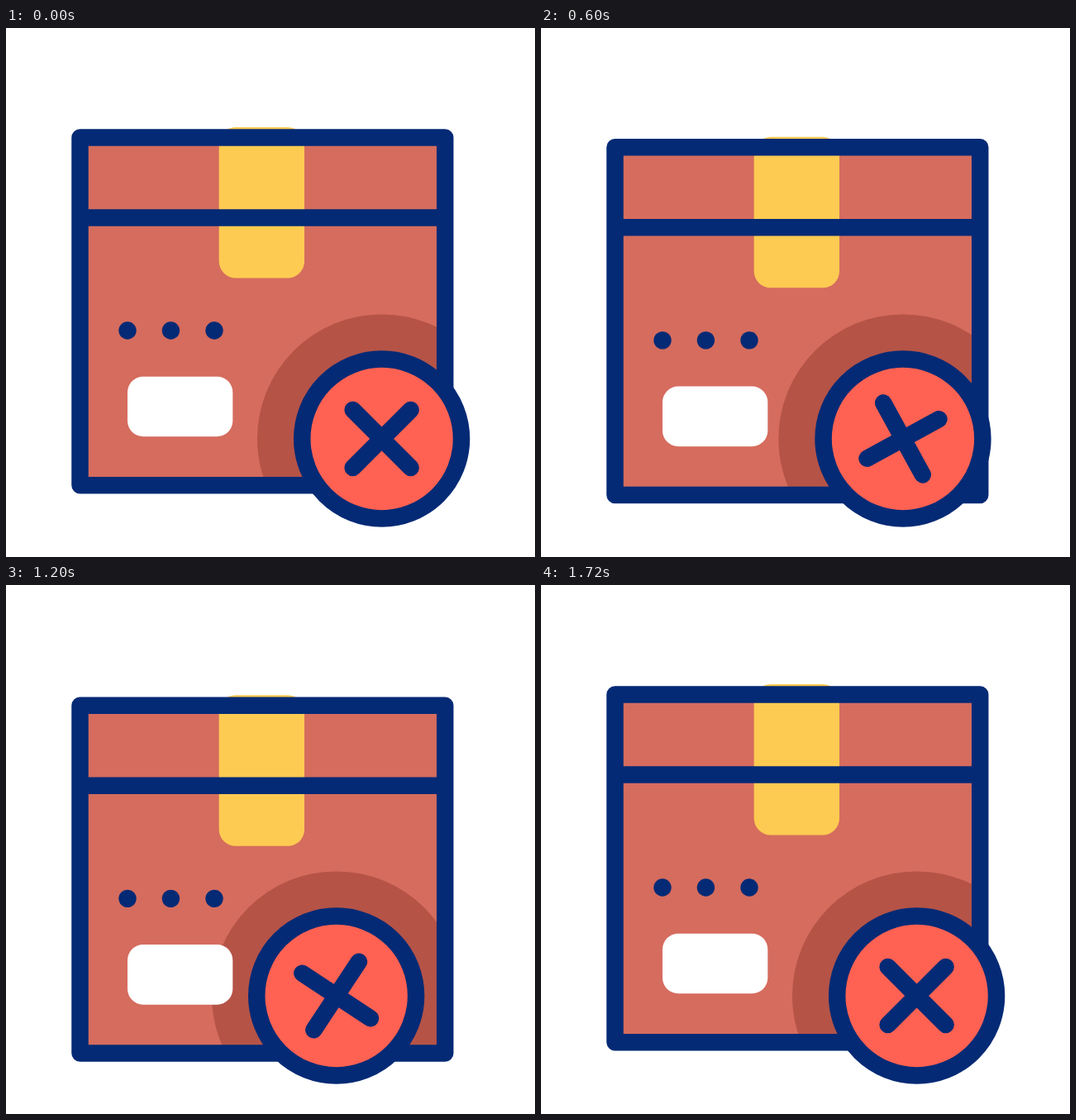
These frames come from a looping animation (640 px wide and 640 px high, 2000 ms). An HTML page:

```html
<!DOCTYPE html>
<html lang="en">
<head>
<meta charset="utf-8">
<title>Cancelled parcel</title>
<style>
  html, body { margin: 0; height: 100%; overflow: hidden; background: #fff; }
  svg { display: block; width: 100vw; height: 100vh; }
  .line { fill: none; stroke: #042a75; stroke-width: 20.5; stroke-linecap: round; stroke-linejoin: round; }
</style>
</head>
<body>
<svg viewBox="0 0 640 640">
  <clipPath id="inside"><rect x="89.5" y="132.5" width="441.7" height="420.7"/></clipPath>
  <g id="box">
    <g clip-path="url(#inside)">
      <rect x="89" y="132" width="443" height="422" fill="#d56c5e"/>
      <circle id="shadow" r="150.6" fill="#b55347"/>
    </g>
    <rect x="257.7" y="120" width="103.3" height="182.4" rx="20" fill="#fecb52"/>
    <rect x="147" y="421.7" width="127.3" height="72.6" rx="19" fill="#fff"/>
    <g fill="#042a75">
      <circle cx="147" cy="366" r="10.7"/>
      <circle cx="199.4" cy="366" r="10.7"/>
      <circle cx="252" cy="366" r="10.7"/>
    </g>
    <path class="line" d="M89.5 132.5H531.2V553.2H89.5ZM89.5 229.5H531.2"/>
  </g>
  <g id="badge">
    <circle class="line" r="96.4" style="fill:#ff6152"/>
    <path id="cross" class="line" d="M-35-35 35 35M-35 35 35-35"/>
  </g>
</svg>
<script>
const LOOP = 2000, STEP = 40, HOME_X = 454.6, HOME_Y = 497;
const [box, shadow, badge, cross] =
  ['box', 'shadow', 'badge', 'cross'].map(id => document.getElementById(id));

// [time, value] keys
const drop = [[183, 0], [923, 19.5], [1633, 0]];
const shake = [[180, 0], [422, 44.5], [714, -45], [957, 43], [1196, -55], [1453, 34], [1710, 0]];
const tilt = [[360, 0], [1320, 0]];

// cubic-bezier(.42, 0, .58, 1), solved by bisection
function ease(x) {
  let lo = 0, hi = 1, u = 0.5;
  for (let i = 0; i < 20; i++) {
    u = (lo + hi) / 2;
    const v = 1 - u;
    if (1.26 * v * v * u + 1.74 * v * u * u + u ** 3 < x) lo = u; else hi = u;
  }
  return u * u * (3 - 2 * u);
}

function valueAt(keys, t) {
  const next = keys.findIndex(([time]) => time > t);
  if (next < 1) return 0;
  const [t0, a] = keys[next - 1], [t1, b] = keys[next];
  return a + (b - a) * ease((t - t0) / (t1 - t0));
}

function tiltAt(t) {
  const [[start], [end]] = tilt;
  return t > start && t < end ? 16.3 * Math.sin((t - start) / (end - start) * 2 * Math.PI) : 0;
}

function draw(now) {
  const t = Math.floor(now % LOOP / STEP) * STEP;
  const y = valueAt(drop, t), x = HOME_X + valueAt(shake, t);
  box.setAttribute('transform', `translate(0 ${y})`);
  shadow.setAttribute('cx', x);
  shadow.setAttribute('cy', HOME_Y - y);
  badge.setAttribute('transform', `translate(${x} ${HOME_Y})`);
  cross.setAttribute('transform', `rotate(${tiltAt(t)})`);
}

let origin;
function tick(now) {
  origin ??= now;
  draw(now - origin);
  requestAnimationFrame(tick);
}
draw(0);
requestAnimationFrame(tick);
</script>
</body>
</html>
```
